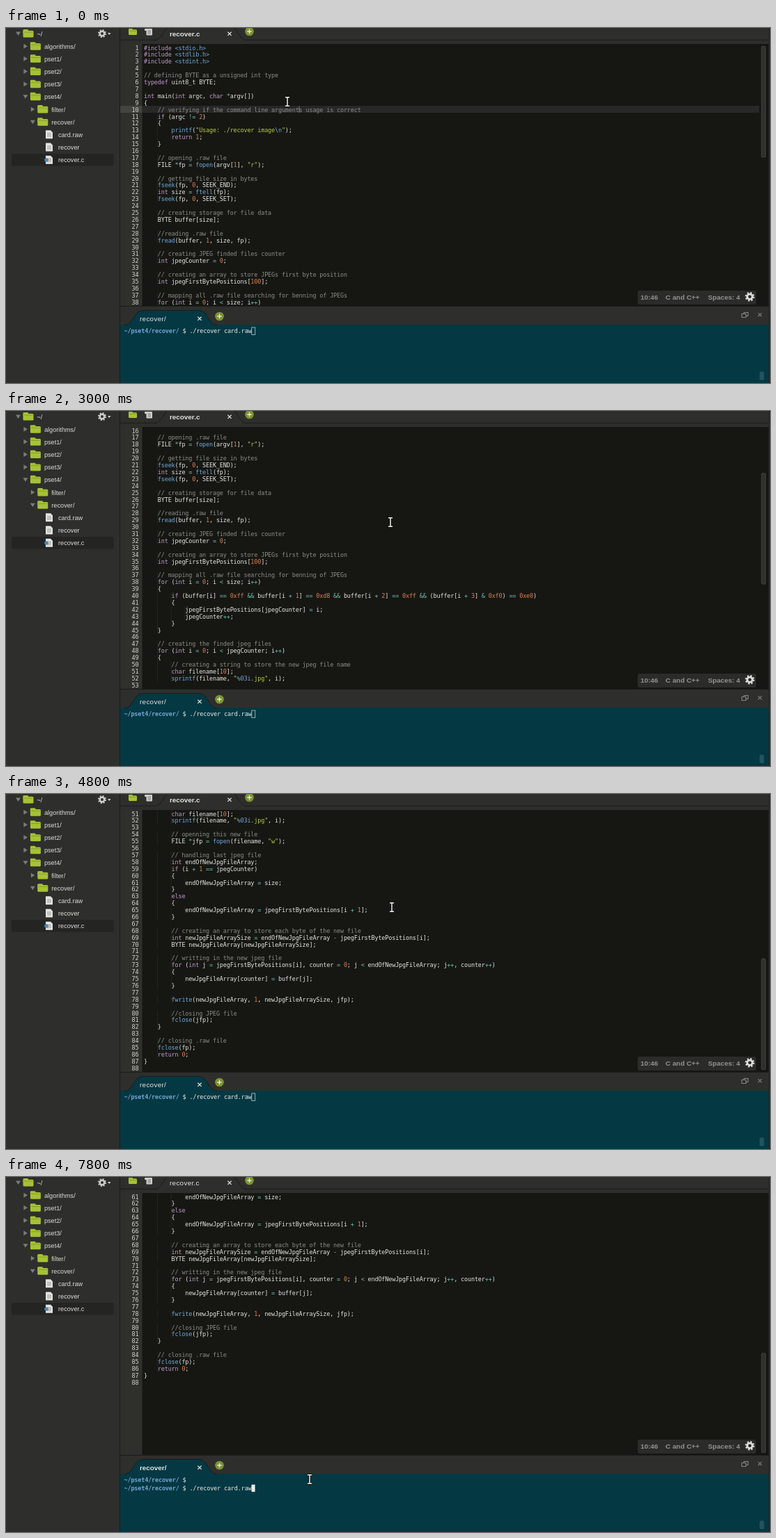
Animation, 1097 px wide and 511 px high, one loop 8000 ms. Source, as an HTML page with a canvas:

```html
<!DOCTYPE html>
<html lang="en">
<head>
<meta charset="utf-8">
<title>Code editor</title>
<style>
html, body { margin: 0; height: 100%; overflow: hidden; background: #2e2f2c; }
canvas { display: block; }
</style>
</head>
<body>
<canvas id="stage" width="1097" height="511"></canvas>
<script>
const ctx = document.getElementById('stage').getContext('2d');
const MONO = '"DejaVu Sans Mono", monospace';
const SANS = '"Liberation Sans", Arial, sans-serif';
const LOOP = 8000, TICK = 100;
const CELL = 4.947, ROW = 9.894, ROWS = 38, CODE_X = 198, CODE_Y = 23.6;
const PANEL = '#2e2f2c', EDITOR = '#161712', TERMINAL = '#043843', EDGE = '#1b1c19';
const LIGHT = '#dcdcd8', GREEN = '#a6c234', MUTED = '#92938f';

const code = String.raw`#include <stdio.h>
#include <stdlib.h>
#include <stdint.h>

// defining BYTE as a unsigned int type
typedef uint8_t BYTE;

int main(int argc, char *argv[])
{
    // verifying if the command line arguments usage is correct
    if (argc != 2)
    {
        printf("Usage: ./recover image\n");
        return 1;
    }

    // opening .raw file
    FILE *fp = fopen(argv[1], "r");

    // getting file size in bytes
    fseek(fp, 0, SEEK_END);
    int size = ftell(fp);
    fseek(fp, 0, SEEK_SET);

    // creating storage for file data
    BYTE buffer[size];

    //reading .raw file
    fread(buffer, 1, size, fp);

    // creating JPEG finded files counter
    int jpegCounter = 0;

    // creating an array to store JPEGs first byte position
    int jpegFirstBytePositions[100];

    // mapping all .raw file searching for benning of JPEGs
    for (int i = 0; i < size; i++)
    {
        if (buffer[i] == 0xff && buffer[i + 1] == 0xd8 && buffer[i + 2] == 0xff && (buffer[i + 3] & 0xf0) == 0xe0)
        {
            jpegFirstBytePositions[jpegCounter] = i;
            jpegCounter++;
        }
    }

    // creating the finded jpeg files
    for (int i = 0; i < jpegCounter; i++)
    {
        // creating a string to store the new jpeg file name
        char filename[10];
        sprintf(filename, "%03i.jpg", i);

        // openning this new file
        FILE *jfp = fopen(filename, "w");

        // handling last jpeg file
        int endOfNewJpgFileArray;
        if (i + 1 == jpegCounter)
        {
            endOfNewJpgFileArray = size;
        }
        else
        {
            endOfNewJpgFileArray = jpegFirstBytePositions[i + 1];
        }

        // creating an array to store each byte of the new file
        int newJpgFileArraySize = endOfNewJpgFileArray - jpegFirstBytePositions[i];
        BYTE newJpgFileArray[newJpgFileArraySize];

        // writting in the new jpeg file
        for (int j = jpegFirstBytePositions[i], counter = 0; j < endOfNewJpgFileArray; j++, counter++)
        {
            newJpgFileArray[counter] = buffer[j];
        }

        fwrite(newJpgFileArray, 1, newJpgFileArraySize, jfp);

        //closing JPEG file
        fclose(jfp);
    }

    // closing .raw file
    fclose(fp);
    return 0;
}
`.split('\n');

// Later rules override earlier ones.
const rules = [
  [/[-+*=!<>&]+/g, '#70c0b1'],
  [/\b(0x[\da-f]+|\d+)\b/g, '#e0805a'],
  [/\b(int|char|if|else|for|return|typedef)\b|#include/g, '#c09ad0'],
  [/\b(s?printf|f(open|seek|tell|read|write|close))\b|<\w+\.h>/g, '#6fa8dc'],
  [/"[^"]*"/g, '#b9ca4a'],
  [/\\n|%03i/g, '#6fa8dc'],
  [/\/\/.*/g, '#8b8c88'],
];
const colours = code.map(line => {
  const out = Array(line.length).fill('#e4e4e0');
  for (const [re, colour] of rules)
    for (const m of line.matchAll(re)) out.fill(colour, m.index, m.index + m[0].length);
  return out;
});

// Each wheel notch scrolls five lines.
const notches = [1600, 1600, 1700, 3200, 3200, 3700, 4400, 4500, 4600, 4800, 6000, 6100];
const topLine = t => 1 + 5 * notches.filter(n => n <= t).length;

// Pointer moves: start, end, target x, target y
const moves = [
  [300, 400, 436, 131], [500, 900, 1013, 157], [900, 1300, 538, 155],
  [2700, 3000, 552, 160], [3300, 3400, 553, 161], [4300, 4800, 554, 163],
  [6400, 6800, 444, 428], [6900, 7200, 440, 434], [7500, 7800, 436, 435],
];
function pointerAt(t) {
  let x = 404, y = 106;
  for (const [start, end, tx, ty] of moves) {
    const p = Math.min(1, Math.max(0, (t - start) / (end - start)));
    const eased = (1 - Math.cos(p * Math.PI)) / 2;
    x += (tx - x) * eased;
    y += (ty - y) * eased;
  }
  return [x, y];
}

function rect(x, y, w, h, colour, r = 0) {
  ctx.fillStyle = colour;
  ctx.beginPath();
  ctx.roundRect(x, y, w, h, r);
  ctx.fill();
}

function poly(points, colour) {
  ctx.fillStyle = colour;
  ctx.beginPath();
  for (const [x, y] of points) ctx.lineTo(x, y);
  ctx.fill();
}

function disc(x, y, r, colour) {
  ctx.fillStyle = colour;
  ctx.beginPath();
  ctx.arc(x, y, r, 0, 7);
  ctx.fill();
}

function lines(colour, width, ...segments) {
  ctx.strokeStyle = colour;
  ctx.lineWidth = width;
  ctx.beginPath();
  for (const [x1, y1, x2, y2] of segments) {
    ctx.moveTo(x1, y1);
    ctx.lineTo(x2, y2);
  }
  ctx.stroke();
}

function label(str, x, y, size, colour, weight = 'normal', spacing = 0) {
  ctx.font = `${weight} ${size}px ${SANS}`;
  ctx.letterSpacing = spacing + 'px';
  ctx.fillStyle = colour;
  ctx.fillText(str, x, y);
  ctx.letterSpacing = '0px';
}

// Monospace text on a fixed cell grid; colour is one value or one per character.
function cells(str, x, y, colour, weight = 'normal') {
  ctx.font = `${weight} 8.48px ${MONO}`;
  for (let i = 0; i < str.length; i++) {
    if (str[i] === ' ') continue;
    ctx.fillStyle = Array.isArray(colour) ? colour[i] : colour;
    ctx.fillText(str[i], x + i * CELL, y);
  }
}

const cross = (x, y, r, colour) =>
  lines(colour, 1.3, [x - r, y - r, x + r, y + r], [x - r, y + r, x + r, y - r]);

function gear(x, y, r, colour, hole) {
  disc(x, y, r * 0.74, colour);
  ctx.strokeStyle = colour;
  ctx.lineWidth = r * 0.36;
  ctx.setLineDash([r * 0.82 * Math.PI / 8]);
  ctx.beginPath();
  ctx.arc(x, y, r * 0.82, 0, Math.PI * 2);
  ctx.stroke();
  ctx.setLineDash([]);
  disc(x, y, r * 0.34, hole);
}

function folder(x, y, w, h) {
  rect(x, y, w * 0.5, h * 0.5, GREEN, 1);
  rect(x, y + h * 0.15, w, h * 0.85, GREEN, 1.5);
  rect(x + 1, y + h * 0.32, w - 2, 0.8, '#7f962a');
}

function page(x, y) {
  poly([[x, y], [x + 7, y], [x + 10, y + 3], [x + 10, y + 12], [x, y + 12]], '#e3e3df');
  for (let d = 4.5; d < 9; d += 2) rect(x + 2, y + d - 0.4, 6, 0.8, '#8f8f8b');
}

function arrow(x, y, open) {
  poly(open ? [[x - 3.5, y - 2.5], [x + 3.5, y - 2.5], [x, y + 3]]
            : [[x - 2.5, y - 3.5], [x + 3, y], [x - 2.5, y + 3.5]], '#7b7c78');
}

// One entry per row; leading spaces give the depth, "+" marks an open folder.
const tree = ['+~/', ' algorithms/', ' pset1/', ' pset2/', ' pset3/', '+ pset4/',
  '  filter/', '+  recover/', '   card.raw', '   recover', '   recover.c'];

function sidebar() {
  rect(0, 0, 163, 511, PANEL);
  rect(163, 0, 1, 511, EDGE);
  rect(8, 181, 147, 17.5, '#242522', 2);
  tree.forEach((row, i) => {
    const open = row[0] === '+', entry = row.replace('+', ''), name = entry.trim();
    const x = 24.5 + 10.4 * (entry.length - name.length), y = 8 + i * 18.17;
    if (name.endsWith('/')) {
      folder(x, y - 6, 15, 11.5);
      arrow(x - 7, y, open);
      label(name, x + 20, y + 3.6, 9.19, LIGHT);
    } else {
      page(57, y - 6);
      label(name, 75, y + 3.6, 9.19, LIGHT);
    }
  });
  disc(58, 190, 2.8, '#4a86b8');
  gear(138, 8, 6, '#cfcfca', PANEL);
  poly([[146, 7], [150.5, 7], [148.2, 10]], '#cfcfca');
}

function tab(dx, dy, colour, title, active) {
  ctx.save();
  ctx.translate(dx, dy);
  ctx.fillStyle = colour;
  ctx.strokeStyle = EDGE;
  ctx.lineWidth = 1;
  ctx.beginPath();
  ctx.moveTo(170, 28);
  ctx.bezierCurveTo(184, 26, 182, 7, 197, 6.5);
  ctx.lineTo(277, 6.5);
  ctx.bezierCurveTo(291, 7, 289, 26, 303, 28);
  ctx.fill();
  ctx.stroke();
  label(title, 192, 21.5, 9.89, '#e4e4e0', active ? 'bold' : 'normal', active ? 0 : 0.3);
  cross(278, 18.3, 2.6, '#dededa');
  disc(306.5, 15, 6.3, '#7d9136');
  lines('#e6ead2', 1.3, [303.3, 15, 309.7, 15], [306.5, 11.8, 306.5, 18.2]);
  ctx.restore();
}

function editor(top, focused) {
  rect(164, 0, 931, 23.5, PANEL);
  rect(164, 16.8, 931, 1, EDGE);
  tab(43, -10, PANEL, 'recover.c', focused);
  folder(176, 1, 12, 9);
  rect(199, 1, 10, 3, '#d0d0cb', 1);
  rect(201.5, 1, 8.5, 9.5, '#d0d0cb', 1);
  for (let y = 4; y < 9; y += 2) rect(203.5, y - 0.4, 4.5, 0.8, '#6b6c68');

  rect(164, 23, 931, 377.5, EDITOR);
  rect(164, 23, 31.5, 377.5, '#2f302c');
  for (let n = top; n < top + ROWS && n <= code.length; n++) {
    const line = code[n - 1], y = CODE_Y + (n - top) * ROW, base = y + 8;
    if (n === 10) {
      rect(164, y - 0.6, 31.5, ROW, '#444541');
      rect(195.5, y - 0.6, 886, ROW, '#282926');
    }
    const indent = line.search(/\S/);
    for (let c = 4; c <= indent; c += 4) rect(CODE_X + c * CELL - 0.8, y, 0.7, ROW, '#2a2b27');
    const num = String(n);
    cells(num, 190.5 - num.length * CELL, base, '#d2d2ce');
    cells(line, CODE_X, base, colours[n - 1]);
    if (n === 10) rect(CODE_X + 45 * CELL, y, 0.8, ROW - 1, '#a0a09c');
  }

  const total = Math.max(code.length, top - 1 + ROWS), track = 371;
  const thumbY = 26 + track * (top - 1) / total, thumbH = track * ROWS / total;
  rect(1084.5, thumbY, 6.5, thumbH, '#474844', 2);
  rect(1085.3, thumbY + 0.8, 4.9, thumbH - 1.6, '#2f302c', 1.5);

  rect(907, 378, 170, 20, '#2b2c29', 3);
  label('10:46', 911, 390.8, 9.89, MUTED, 'bold');
  label('C and C++', 947, 390.8, 9.89, MUTED, 'bold');
  label('Spaces: 4', 1008, 390.8, 9.89, MUTED, 'bold');
  gear(1068, 386.8, 6.8, '#dededa', '#2b2c29');
}

function prompt(y, command) {
  cells('~/pset4/recover/', 169.5, y, '#73a7d4', 'bold');
  cells('$ ' + command, 169.5 + 17 * CELL, y, '#ececea');
}

function terminal(focused) {
  rect(164, 400, 931, 1, EDGE);
  rect(164, 401, 931, 26.5, PANEL);
  rect(164, 427, 931, 84, TERMINAL);
  tab(0, 400, TERMINAL, 'recover/', focused);
  ctx.strokeStyle = '#8a8b87';
  ctx.lineWidth = 1;
  ctx.strokeRect(1059.5, 409.5, 6, 5);
  rect(1056, 411.5, 7, 6, PANEL);
  ctx.strokeRect(1056.5, 411.5, 6, 5);
  cross(1082.5, 412.7, 2.6, '#777874');

  const command = './recover card.raw', caretX = 169.5 + 37 * CELL;
  if (focused) {
    prompt(438.6, '');
    prompt(450.6, command);
    rect(caretX, 442.8, 5, 10.4, '#f0f0ee');
  } else {
    prompt(439.4, command);
    ctx.strokeStyle = '#a9bcc0';
    ctx.lineWidth = 0.9;
    ctx.strokeRect(caretX + 0.2, 431, 5, 10.4);
  }
  rect(1082, 494.5, 6.5, 12.5, '#24525d', 2.5);
}

function pointer(x, y) {
  const beam = [[x, y - 6, x, y + 6], [x - 3, y - 6.3, x + 3, y - 6.3], [x - 3, y + 6.3, x + 3, y + 6.3]];
  lines('#0c0c0a', 3.2, ...beam);
  lines('#f0f0ee', 1.5, ...beam);
}

let shown;
function frame(now) {
  const t = Math.floor(now % LOOP / TICK) * TICK;
  if (t !== shown) {
    shown = t;
    const inTerminal = t >= 7400;
    sidebar();
    editor(topLine(t), !inTerminal);
    terminal(inTerminal);
    rect(1095, 0, 2, 511, '#262724');
    pointer(...pointerAt(t));
  }
  requestAnimationFrame(frame);
}
frame(performance.now());
</script>
</body>
</html>
```
